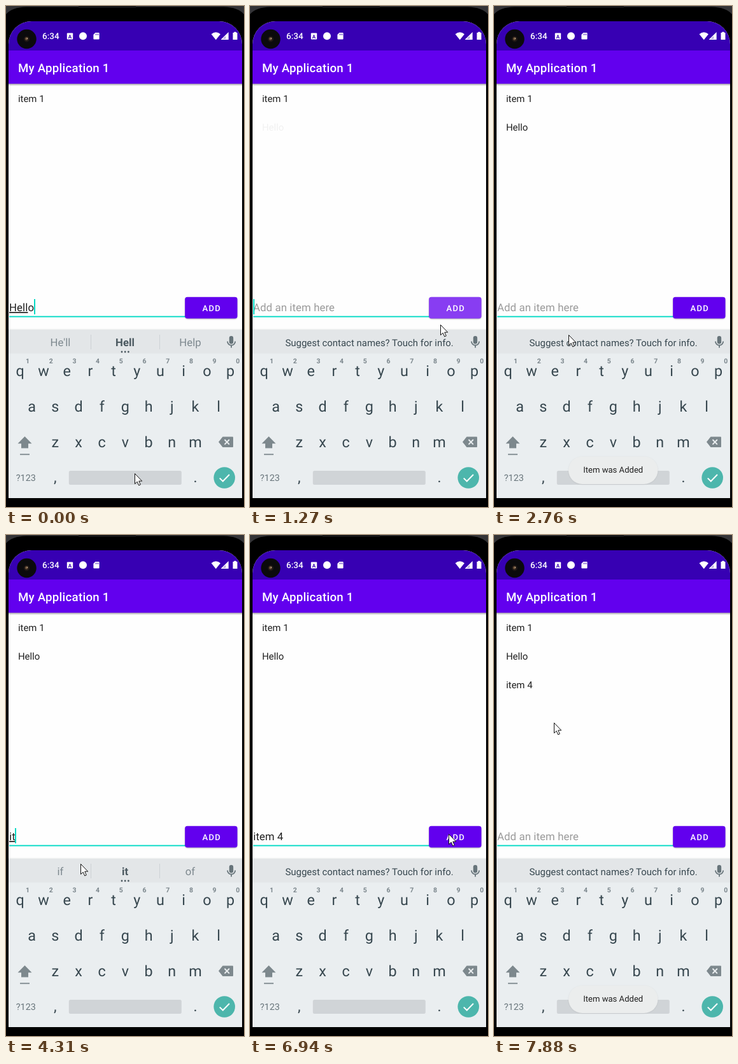
Animation of 374x788 px, one loop 8 s. Source, as an HTML page:

```html
<!DOCTYPE html>
<html lang="en">
<head>
<meta charset="utf-8">
<title>Add an item</title>
<style>
  html, body { margin: 0; width: 100%; height: 100%; overflow: hidden; background: #000; }
  svg { display: block; width: 374px; height: 788px; }
  text { font-family: Roboto, "Open Sans", sans-serif; white-space: pre; text-rendering: geometricPrecision; }
  .mid { text-anchor: middle; }
  .list { font-size: 14.95px; fill: #1f1f1f; }
  .field { font-size: 16.8px; letter-spacing: .1px; }
  .key { font-size: 23.4px; fill: #37474f; }
  .hint { font-size: 10.5px; font-weight: 700; fill: #7b868c; }
  .word { font-size: 16.8px; fill: #7e898f; }
  .word.best { font-weight: 700; fill: #4b5960; }
</style>
</head>
<body>
<svg viewBox="0 0 374 788">
  <defs>
    <clipPath id="screen"><path d="M4 774V60a36 36 0 0 1 36-36H335a36 36 0 0 1 36 36V774Z"/></clipPath>
    <clipPath id="btn"><rect x="281.2" y="457.8" width="82.4" height="33.6" rx="3.7"/></clipPath>
    <linearGradient id="drop" x2="0" y2="1">
      <stop offset="0" stop-opacity=".36"/><stop offset="1" stop-opacity="0"/>
    </linearGradient>
    <filter id="soft" x="-20%" y="-40%" width="140%" height="180%"><feGaussianBlur stdDeviation="1"/></filter>
  </defs>

  <!-- phone body -->
  <rect width="374" height="788"/>
  <path d="M0 0H374V13Q365 2 342 1.5H32Q9 2 0 13Z" fill="#343437"/>
  <rect x="114" width="90" height="3" fill="#151517"/>

  <g clip-path="url(#screen)">
    <rect x="4" y="24" width="367" height="750" fill="#fefefe"/>
    <rect x="4" y="122" width="367" height="4" fill="url(#drop)"/>
    <rect x="4" y="24" width="367" height="46" fill="#3700b3"/>
    <rect x="4" y="70" width="367" height="52.3" fill="#6200ee"/>
    <text x="18.9" y="104" font-size="18.7" font-weight="500" letter-spacing=".24" fill="#fff">My Application 1</text>

    <!-- status bar -->
    <g fill="#fff">
      <text x="57" y="52.2" font-size="13.5" font-weight="500">6:34</text>
      <rect x="95.8" y="42.6" width="9.4" height="10" rx="1"/>
      <text class="mid" x="100.5" y="50.5" font-size="8" font-weight="700" style="fill:#3700b3">A</text>
      <circle cx="121" cy="47.3" r="6"/>
      <path d="M140.4 42h5.2q1 0 1 1v8.6q0 1-1 1h-7.2q-1 0-1-1V45Z"/>
      <path d="M322.6 44.3Q329.8 38 337 44.3L329.8 53.2Z"/>
      <path d="M338 53V52.6L349.7 41V53Z"/>
      <path d="M358.2 40.8h3.6v1.3h1.7V53h-7V42.1h1.7Z"/>
    </g>
    <path d="M141 43.5v2.4M143 43.5v2.4M145 43.5v2.4" stroke="#3700b3" stroke-width=".8"/>
    <path d="M340.5 51.8L345.3 47V51.8Z" fill="#3700b3" opacity=".35"/>
    <circle cx="32.5" cy="52" r="15.2" fill="#0b0a0c"/>
    <circle cx="32.5" cy="52" r="4.4" fill="#211915"/>
    <circle cx="32.2" cy="51.6" r="2.3" fill="#6b5138"/>
    <circle cx="33.3" cy="50.8" r=".9" fill="#c9b59a"/>

    <!-- list -->
    <text class="list" x="18.9" y="151">item 1</text>
    <text class="list added" x="18.9" y="196">Hello</text>
    <text class="list added" x="18.9" y="241">item 4</text>

    <!-- input and button -->
    <rect x="5" y="487.6" width="277" height="1.9" fill="#03dac5"/>
    <text class="field" id="placeholder" x="5" y="480" fill="#9a9a9a">Add an item here</text>
    <text class="field" id="typed" x="5" y="480" fill="#1f1f1f"></text>
    <rect id="compose" x="5" y="481.3" height="1.7" fill="#1f1f1f"/>
    <rect id="caret" y="461" width="2" height="24" fill="#03dac5"/>
    <rect x="281.6" y="459.3" width="81.6" height="33" rx="4" opacity=".35" filter="url(#soft)"/>
    <rect x="281.2" y="457.8" width="82.4" height="33.6" rx="3.7" fill="#6200ee"/>
    <circle id="ripple" cx="306" cy="478" fill="#fff" clip-path="url(#btn)"/>
    <text x="308.6" y="479.7" font-size="13.1" font-weight="500" letter-spacing="1.17" fill="#fff">ADD</text>

    <!-- keyboard -->
    <rect x="4" y="507.6" width="367" height="1.6" opacity=".04"/>
    <rect x="4" y="509" width="367" height="265" fill="#eaeef0"/>
    <rect x="4" y="509" width="367" height="37.5" fill="#e3e6e8"/>
    <g id="words">
      <path d="M133.5 517V540M241.5 517V540" stroke="#cdd2d5"/>
      <text class="word mid" x="85.5" y="535"></text>
      <text class="word best mid" x="187" y="535"></text>
      <text class="word mid" x="289.5" y="535"></text>
      <g fill="#4b5960"><circle cx="182" cy="544" r="1.4"/><circle cx="187.2" cy="544" r="1.4"/><circle cx="192.4" cy="544" r="1.4"/></g>
    </g>
    <text class="mid" id="tip" x="187.6" y="535" font-size="14.95" fill="#37474f">Suggest contact names? Touch for info.</text>
    <rect x="350.8" y="519" width="6.4" height="12.4" rx="3.2" fill="#67747a"/>
    <path d="M348 527.5a6.1 6.1 0 0 0 12.2 0M354.1 533.5V537.6" fill="none" stroke="#67747a" stroke-width="1.8"/>
    <g id="keys"></g>
    <g fill="#7d888d">
      <path d="M29.5 677L40.5 688.3H35V695.5H24V688.3H18.5Z"/>
      <rect x="22" y="704.4" width="15" height="1.8"/>
      <path d="M340.5 677.5H356q1 0 1 1V693q0 1-1 1H340.5L334 685.8Z"/>
    </g>
    <path d="M343.5 682l7.4 7.6M350.9 682l-7.4 7.6" stroke="#eaeef0" stroke-width="1.9"/>
    <text class="mid" x="31.3" y="747.3" font-size="14.3" fill="#67747a">?123</text>
    <rect x="98.8" y="731" width="177" height="22" rx="2.5" fill="#d0d4d7"/>
    <circle cx="343.2" cy="742" r="16.8" fill="#4db6ac"/>
    <path d="M335.8 742.6L340.8 747.5L351 737" fill="none" stroke="#fff" stroke-width="2"/>

    <g id="toast">
      <rect x="117" y="709" width="140.5" height="43.5" rx="21.7" opacity=".08" filter="url(#soft)"/>
      <rect x="117" y="708.5" width="140.5" height="43.5" rx="21.7" fill="#ebeded"/>
      <text class="mid" x="187.2" y="734" font-size="13.1" fill="#202020">Item was Added</text>
    </g>
  </g>
  <path id="mouse" d="M.5 .5V16.6L4.2 13.2L6.7 19L9.3 17.9L6.8 12.2H11.7Z" fill="#fff" stroke="#111" stroke-width="1"/>
</svg>

<script>
const LOOP = 8000;
const ADDS = [1240, 7210];      // the two presses of ADD
const TYPE_START = 4180, TYPE_STEP = 100, DIGIT_AT = 5260;
const BLINK = 500;

const moves = [ // start, end, x, y
  { from: 560, to: 1000, x: 300, y: 479 },
  { from: 1140, to: 1260, x: 299, y: 501 },
  { from: 1280, to: 1900, x: 117, y: 517 },
  { from: 6000, to: 6700, x: 300, y: 448 },
  { from: 6790, to: 6930, x: 312, y: 470 },
  { from: 7280, to: 7870, x: 94, y: 295 }
];
const suggestions = {
  Hell: "He'll Hell Help", Hello: "He'll Hello Hell",
  i: 'if it of', it: 'if it of', ite: 'if it of', item: 'if it of', 'item ': 'in is to'
};

const $ = id => document.getElementById(id);
const ramp = (t, from, to) => Math.min(1, Math.max(0, (t - from) / (to - from)));
const ease = p => p * p * (3 - 2 * p);
const set = (el, attrs) => {
  for (const name in attrs) el.setAttribute(name, attrs[name]);
};

function addKey(cls, x, y, label) {
  const key = document.createElementNS('http://www.w3.org/2000/svg', 'text');
  set(key, { class: cls + ' mid', x, y });
  key.textContent = label;
  $('keys').append(key);
}

const PITCH = 36.7;
['qwertyuiop', 'asdfghjkl', 'zxcvbnm'].forEach((row, r) =>
  [...row].forEach((c, i) =>
    addKey('key', 187.4 + (i - (row.length - 1) / 2) * PITCH, 582 + 56 * r, c)));
[...'1234567890'].forEach((c, i) => addKey('hint', 34 + i * PITCH, 562.3, c));
addKey('key', 77.3, 749, ',');
addKey('key', 297.5, 749, '.');

const slots = [...document.querySelectorAll('.word')];
const added = [...document.querySelectorAll('.added')];

function mouseAt(t) {
  let x = 202, y = 735;
  for (const m of moves) {
    const p = ease(ramp(t, m.from, m.to));
    x += (m.x - x) * p;
    y += (m.y - y) * p;
  }
  return `translate(${x} ${y})`;
}

// Field text and the time of the last edit, which restarts the caret's blink.
function fieldAt(t) {
  if (t < ADDS[0]) return ['Hello', 0];
  if (t < TYPE_START) return ['', ADDS[0]];
  if (t >= ADDS[1]) return ['', ADDS[1]];
  if (t >= DIGIT_AT) return ['item 4', DIGIT_AT];
  const count = Math.min(5, 1 + Math.floor((t - TYPE_START) / TYPE_STEP));
  return ['item '.slice(0, count), TYPE_START + (count - 1) * TYPE_STEP];
}

function drawField(t) {
  const [text, edited] = fieldAt(t);
  const typed = $('typed');
  typed.textContent = text;
  const width = n => n ? typed.getSubStringLength(0, n) : 0;
  set($('placeholder'), { opacity: text ? 0 : 1 });
  set($('caret'), {
    x: Math.floor(5 + width(text.length)),
    opacity: (t - edited) % (2 * BLINK) < BLINK ? 1 : 0
  });

  // The keyboard lags one letter behind the first word.
  const marked = t < 270 ? 'Hell' : text;
  set($('compose'), { width: /^[a-z]+$/i.test(marked) ? width(marked.length) : 0 });
  const words = (suggestions[marked] || '').split(' ');
  const shown = words.length > 1;
  slots.forEach((slot, i) => slot.textContent = shown ? words[i] : '');
  set($('words'), { opacity: shown ? 1 : 0 });
  set($('tip'), { opacity: shown ? 0 : 1 });
}

function drawAdds(t) {
  let glow = 0, radius = 0, toast = 0;
  ADDS.forEach((start, i) => {
    const u = t - start;
    set(added[i], { opacity: ramp(u, 20, 220) });
    glow += .24 * (ramp(u, -130, -60) - ramp(u, 40, 260));
    radius = Math.max(radius, u < 300 ? 75 * ramp(u, -150, 20) : 0);
    toast += ramp(u, 120, 350) - ramp(u, 2050, 2250);
  });
  set($('ripple'), { r: radius, opacity: glow });
  set($('toast'), { opacity: toast });
}

function draw(t) {
  set($('mouse'), { transform: mouseAt(t) });
  drawField(t);
  drawAdds(t);
}

const start = performance.now();
function tick() {
  draw((performance.now() - start) % LOOP);
  requestAnimationFrame(tick);
}
tick();
</script>
</body>
</html>
```
